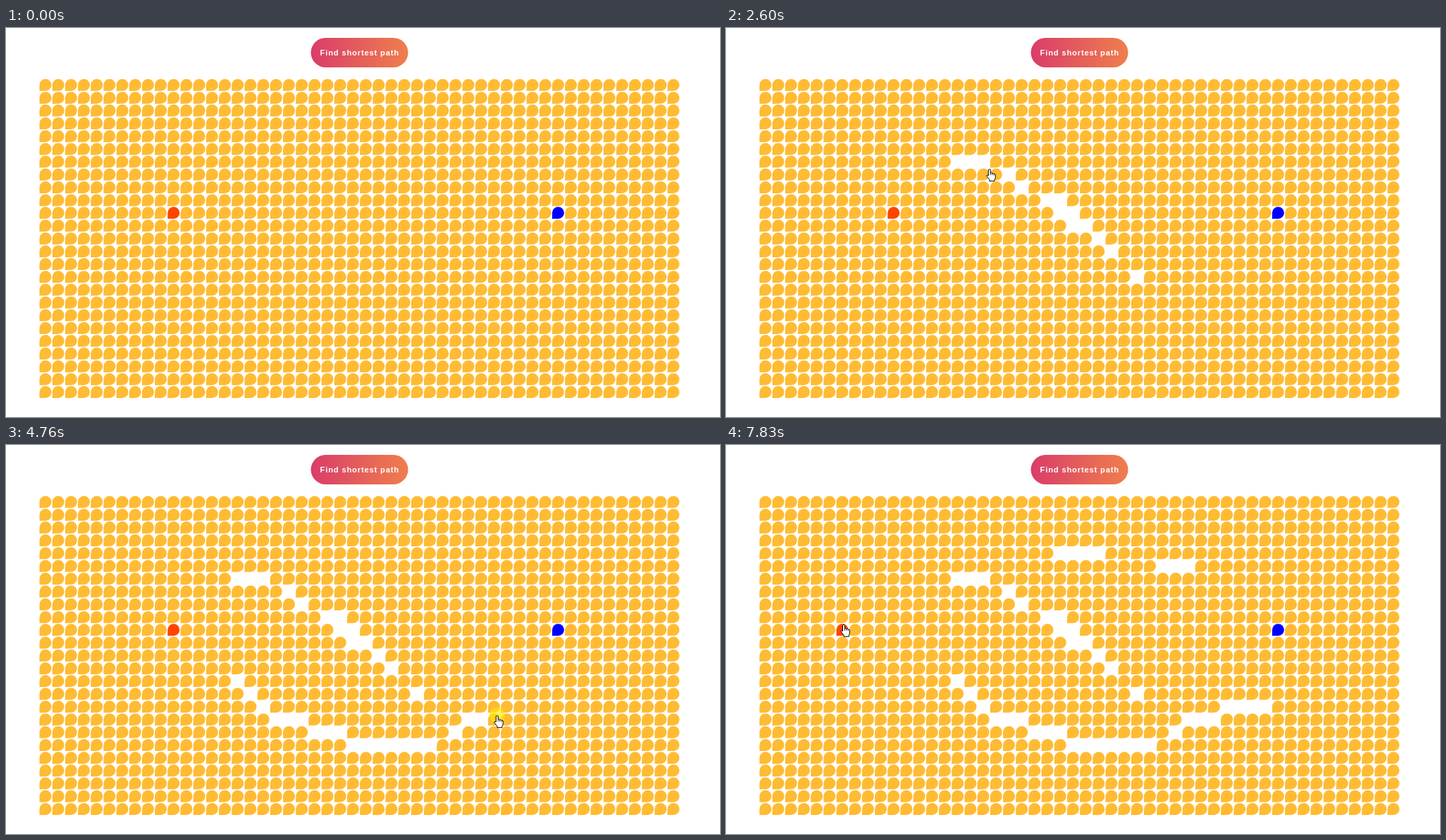
An HTML page with a canvas that plays this animation: 1013 by 553 pixels, repeating every 8 s.

```html
<!DOCTYPE html>
<html>
<head>
<meta charset="utf-8">
<style>
  html, body { margin: 0; width: 100%; height: 100%; overflow: hidden; background: #fff; }
  canvas { display: block; }
</style>
</head>
<body>
<canvas id="stage" width="1013" height="553"></canvas>
<script>
const ctx = document.getElementById('stage').getContext('2d');
const LOOP = 8000, TICK = 64;
const COLS = 50, ROWS = 25, PITCH = 18.184, SIZE = 17, LEFT = 47.5, TOP = 72.5;
const HOME_ROW = 10, START_COL = 10, FINISH_COL = 40;

// Each move bends from the previous end point towards a new one in a few ticks.
const moves = [
  { at: 530, ticks: 3, bend: [956, 540], to: [842, 514] },
  { at: 870, ticks: 4, bend: [721, 440], to: [600, 367] },
  { at: 1400, ticks: 6, bend: [533, 307], to: [467, 247] },
  { at: 2000, ticks: 5, bend: [395, 193], to: [324, 188] },
  { at: 2600, ticks: 10, bend: [539, 230], to: [314, 327] },
  { at: 3710, ticks: 5, bend: [304, 326], to: [449, 399] },
  { at: 4240, ticks: 4, bend: [516, 432], to: [584, 428] },
  { at: 4630, ticks: 7, bend: [656, 390], to: [761, 369] },
  { at: 5380, ticks: 5, bend: [712, 277], to: [664, 185] },
  { at: 5850, ticks: 6, bend: [565, 149], to: [466, 149] },
  { at: 6400, ticks: 11, bend: [350, 240], to: [242, 259] },
  { at: 7430, ticks: 7, bend: [205, 268], to: [167, 255] }
];
moves.forEach((move, i) => move.from = i ? moves[i - 1].to : [1070, 565]);

const ease = p => 1 - (1 - p ** 1.3) ** 2.8;

function tipAt(t) {
  const move = moves.findLast(m => m.at <= t);
  if (!move) return null;
  const tick = Math.min(move.ticks, Math.floor((t - move.at) / TICK) + 1);
  const u = ease(tick / move.ticks), v = 1 - u;
  const [x, y] = [0, 1].map(a =>
    v * v * move.from[a] + 2 * u * v * move.bend[a] + u * u * move.to[a]);
  return { x, y };
}

// Dragging draws walls along lines between [column, row] corners.
const drags = [
  { down: 1400, up: 2400, dir: -1, lines: [
    [[29, 15]],
    [[27, 13], [25, 11], [24, 11], [24, 10], [23, 10], [23, 9], [22, 9]],
    [[20, 8], [19, 7]],
    [[17, 6], [15, 6]]] },
  { down: 3510, up: 5180, dir: 1, lines: [
    [[15, 14], [18, 17], [23, 18], [24, 19], [30, 19]],
    [[32, 18], [33, 17], [38, 16], [39, 16]]] },
  { down: 5850, up: 6200, dir: -1, lines: [
    [[33, 5], [31, 5]],
    [[26, 4], [23, 4]]] },
  { down: 7290, up: 7820, lines: [] }
];

function cellsAlong(line) {
  const cells = [line[0]];
  for (let i = 1; i < line.length; i++) {
    const [c, r] = line[i - 1], dc = line[i][0] - c, dr = line[i][1] - r;
    const n = Math.max(Math.abs(dc), Math.abs(dr));
    for (let k = 1; k <= n; k++) cells.push([Math.round(c + dc * k / n), Math.round(r + dr * k / n)]);
  }
  return cells;
}
drags.forEach(drag => drag.cells = drag.lines.flatMap(cellsAlong));

const colX = col => LEFT + col * PITCH;
const rowY = row => TOP + row * PITCH;
const cellId = (col, row) => row * COLS + col;

// A cell turns into wall once the cursor has left it, or on release.
function wallsAt(t) {
  const walls = new Set();
  for (const { down, up, dir, cells } of drags) {
    if (t < down) continue;
    const { x } = tipAt(t);
    for (const [col, row] of cells) {
      const exit = colX(col) + (dir > 0 ? SIZE : 0);
      if (t >= up || (x - exit) * dir >= 0) walls.add(cellId(col, row));
    }
  }
  return walls;
}

function startCol(t) {
  if (t < drags[3].down) return START_COL;
  return Math.min(START_COL, Math.floor((tipAt(t).x - LEFT) / PITCH));
}

function drawGrid(t) {
  const walls = wallsAt(t), start = startCol(t), r = SIZE / 2;
  for (let row = 0; row < ROWS; row++) {
    for (let col = 0; col < COLS; col++) {
      if (walls.has(cellId(col, row))) continue;
      const home = row === HOME_ROW;
      ctx.fillStyle = home && col === start ? '#ff4500'
        : home && col === FINISH_COL ? '#0000ff' : '#ffbb33';
      ctx.beginPath();
      ctx.roundRect(colX(col), rowY(row), SIZE, SIZE, [r, r, r, 0]);
      ctx.fill();
    }
  }
}

const pill = ctx.createLinearGradient(433, 0, 570, 0);
pill.addColorStop(0, '#da3d69');
pill.addColorStop(1, '#ef7e4d');

function drawButton() {
  ctx.fillStyle = pill;
  ctx.beginPath();
  ctx.roundRect(432.5, 14, 138, 42, 21);
  ctx.fill();
  ctx.fillStyle = '#fff';
  ctx.font = 'bold 11.2px "Liberation Sans", Arial, sans-serif';
  ctx.letterSpacing = '0.82px';
  ctx.fillText('Find shortest path', 445.6, 39);
}

const hand = new Path2D('M-1.5 9.7V1.6Q-1.4 .5 0 .5T1.5 1.6V5.8Q3.2 5 4 6.4Q5.7 5.6 6.4 7.2' +
  'Q8.5 6.6 8.5 8.6V12Q8.5 14 7.2 15.3V17.4H.2V15.5L-3.4 11Q-4.4 9.2-3.1 8.7Q-2.2 8.5-1.5 9.7Z');
const knuckles = new Path2D('M1.5 5.8V9M4 6.4V9M6.4 7.2V9.4');

function drawCursor(t) {
  const tip = tipAt(t);
  if (!tip) return;
  ctx.save();
  ctx.translate(tip.x, tip.y);
  if (drags.some(({ down, up }) => t >= down && t < up)) {
    ctx.fillStyle = 'rgba(255, 232, 0, 0.62)';
    ctx.beginPath();
    ctx.arc(0, 0, 11, 0, Math.PI * 2);
    ctx.fill();
  }
  ctx.fillStyle = '#fff';
  ctx.strokeStyle = '#000';
  ctx.lineWidth = 1;
  ctx.lineJoin = 'round';
  ctx.fill(hand);
  ctx.stroke(hand);
  ctx.lineWidth = 0.8;
  ctx.stroke(knuckles);
  ctx.restore();
}

function frame() {
  const t = performance.now() % LOOP;
  ctx.fillStyle = '#fff';
  ctx.fillRect(0, 0, 1013, 553);
  drawButton();
  drawGrid(t);
  drawCursor(t);
  requestAnimationFrame(frame);
}
frame();
</script>
</body>
</html>
```
